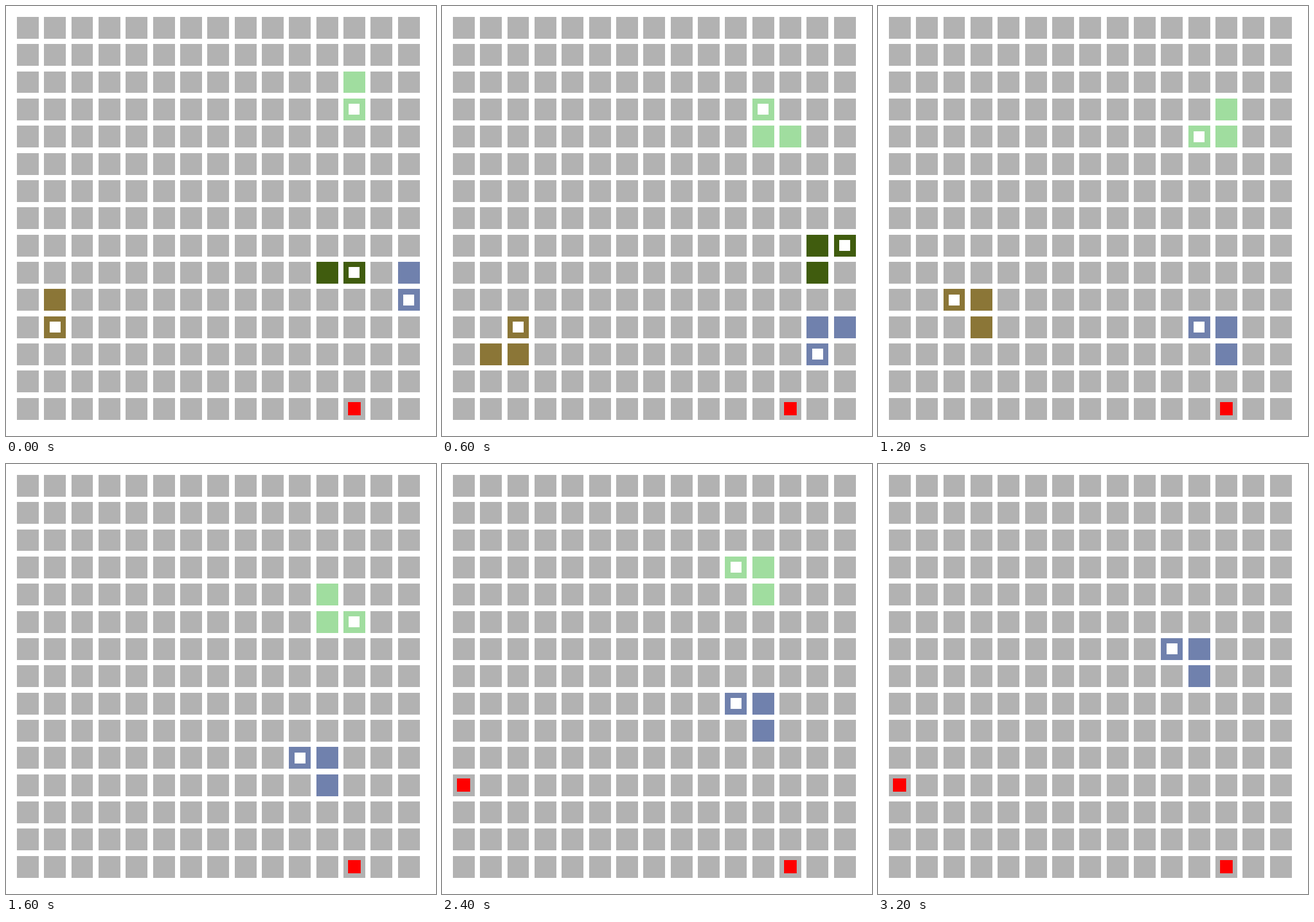
Write an HTML page with a canvas that moves like this. It is 748 by 748 pixels and loops after 3400 ms.

```html
<!DOCTYPE html>
<html lang="en">
<head>
<meta charset="utf-8">
<title>Snakes on a grid</title>
<style>
html, body { margin: 0; width: 100%; height: 100%; overflow: hidden; background: #fff; }
canvas { display: block; }
</style>
</head>
<body>
<canvas id="stage" width="748" height="748"></canvas>
<script>
const ctx = document.getElementById('stage').getContext('2d');
const SIZE = 15, UNIT = 748 / 79, STEP = 200, STEPS = 17, LENGTH = 3;
const DIRS = { U: [0, -1], D: [0, 1], L: [-1, 0], R: [1, 0] };

// A snake starts at its tail cell and dies when its moves run out.
const snakes = [
  { color: '#a0dd9f', start: [12, 2], moves: 'DDLURDLDRULULDRD' },
  { color: '#405c0e', start: [11, 9], moves: 'RRUR' },
  { color: '#7081ad', start: [14, 9], moves: 'DDLDLULULURULURUL' },
  { color: '#8b7637', start: [1, 10], moves: 'DDRURULU' }
];
const food = [
  { cell: [12, 14], from: 0 },
  { cell: [0, 11], from: 12 }
];

for (const s of snakes) {
  s.path = [s.start];
  for (const m of s.moves) {
    const [x, y] = s.path[s.path.length - 1];
    const [dx, dy] = DIRS[m];
    s.path.push([x + dx, y + dy]);
  }
}

const snap = u => Math.round(u * UNIT - 0.015);

function square([col, row], color, inset = 0) {
  const edge = i => 2 + 5 * i + inset;
  const side = 4 - 2 * inset;
  const x = snap(edge(col)), y = snap(edge(row));
  ctx.fillStyle = color;
  ctx.fillRect(x, y, snap(edge(col) + side) - x, snap(edge(row) + side) - y);
}

function draw(step) {
  ctx.fillStyle = '#fff';
  ctx.fillRect(0, 0, 748, 748);
  for (let row = 0; row < SIZE; row++)
    for (let col = 0; col < SIZE; col++) square([col, row], '#b2b2b2');

  for (const f of food) if (step >= f.from) square(f.cell, '#f00', 0.8);

  for (const s of snakes) {
    if (step >= s.moves.length) continue;
    const head = step + 1;
    const body = s.path.slice(Math.max(0, head + 1 - LENGTH), head + 1);
    for (const cell of body) square(cell, s.color);
    square(s.path[head], '#fff', 1);
  }
}

const begin = performance.now();
function tick() {
  const elapsed = performance.now() - begin;
  draw(Math.floor(elapsed / STEP) % STEPS);
  requestAnimationFrame(tick);
}
tick();
</script>
</body>
</html>
```
